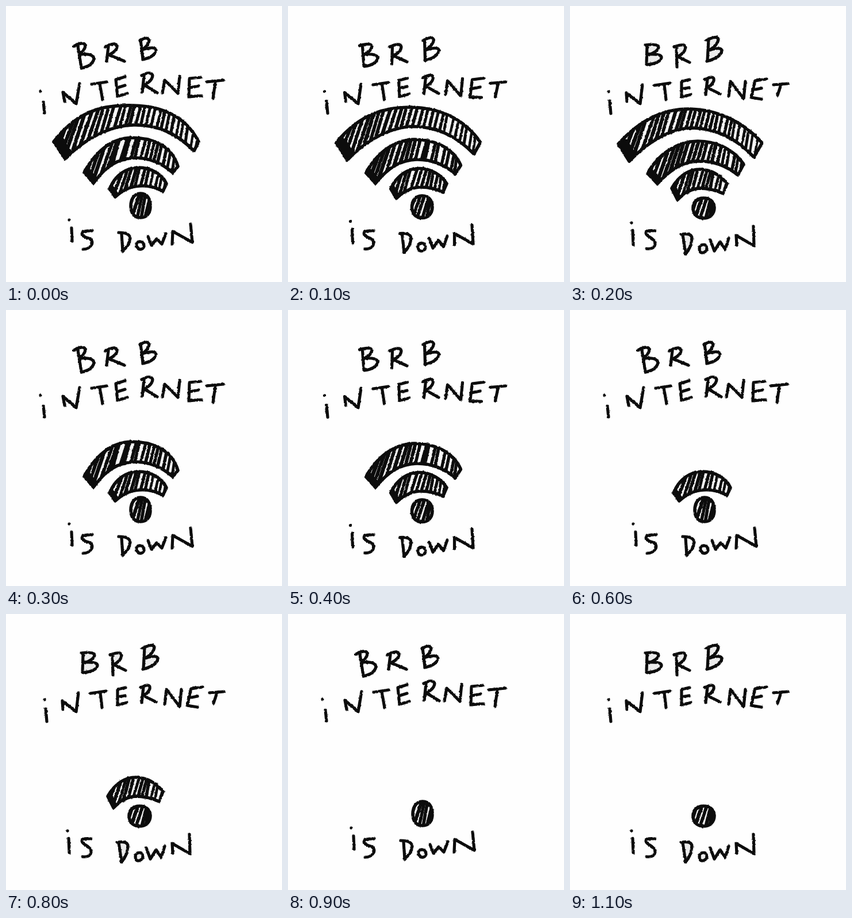
An HTML page that plays this animation: 480 px wide and 480 px high, repeating every 1.2 s.

```html
<!DOCTYPE html>
<html lang="en">
<head>
<meta charset="utf-8">
<title>BRB, internet is down</title>
<style>
  html, body { margin: 0; width: 100%; height: 100%; overflow: hidden; background: #fefefe; }
  svg { display: block; width: 100vw; height: 100vh; }
  .ink { fill: none; stroke: #0c0c0c; stroke-width: 5.2; stroke-linecap: round; stroke-linejoin: round; }
  .pose { opacity: 0; animation: pose .3s step-end infinite; }
  .pose1 { animation-delay: -.2s; }
  .pose2 { animation-delay: -.1s; }
  .big { animation: big 1.2s step-end infinite; }
  .mid { animation: mid 1.2s step-end infinite; }
  .small { animation: small 1.2s step-end infinite; }
  @keyframes pose { 0% { opacity: 1; } 33.3333%, 100% { opacity: 0; } }
  @keyframes big { 0% { opacity: 1; } 25%, 100% { opacity: 0; } }
  @keyframes mid { 0% { opacity: 1; } 50%, 100% { opacity: 0; } }
  @keyframes small { 0% { opacity: 1; } 75%, 100% { opacity: 0; } }
</style>
</head>
<body>
<svg id="stage" viewBox="0 0 480 480" role="img" aria-label="BRB internet is down">
  <filter id="rough" filterUnits="userSpaceOnUse" x="0" y="0" width="480" height="480" color-interpolation-filters="sRGB">
    <feTurbulence type="fractalNoise" baseFrequency=".28" numOctaves="1" seed="4"/>
    <feDisplacementMap in="SourceGraphic" scale="3" xChannelSelector="R" yChannelSelector="G"/>
  </filter>
</svg>
<script>
// Every shape has two drawings with the same structure; the third is a blend.
// Bowls come before stems so that their shading stays underneath.
const brb = [
  ['M118 70Q134 61 138 68Q138 76 128 84Q152 82 153 92Q150 104 132 108',
   'M131 68Q153 65 154 72Q153 79 138 84Q160 83 159 90Q156 100 134 102'],
  ['M125 70L131 107', 'M134 70L133 101'],
  ['M173 71Q190 62 193 69Q194 78 179 85', 'M181 71Q200 64 201 72Q200 82 187 88'],
  ['M178 71L175 96', 'M185 72L186 106'],
  ['M179 85L206 96', 'M187 88L208 98'],
  ['M233 60Q246 52 249 60Q248 68 237 76Q260 69 261 77Q258 89 238 93',
   'M237 60Q256 50 258 58Q257 68 242 77Q264 70 264 78Q262 90 238 96'],
  ['M234 59L238 92', 'M241 59L239 95']
];
const internet = [
  ['M60 148L60 148', 'M67 149L67 149'],
  ['M65 167L67 186', 'M69 164L71 187'],
  ['M102 166L99 150L122 170L128 135', 'M99 166L98 151L122 170L126 137'],
  ['M149 136L175 132', 'M147 138L174 134'],
  ['M163 135L168 163', 'M164 137L167 163'],
  ['M207 123L191 128L194 157L211 152', 'M208 128L194 131L194 158L210 154'],
  ['M194 142L207 138', 'M195 144L207 142'],
  ['M236 121Q252 112 255 121Q254 131 240 137', 'M234 128Q252 119 250 130Q247 138 239 142'],
  ['M240 121L237 150', 'M239 127L236 154'],
  ['M240 137L263 151', 'M239 142L261 153'],
  ['M272 151L276 129L299 152L302 122', 'M276 157L279 131L302 161L305 131'],
  ['M339 124L319 126L318 158L340 156', 'M342 127L322 130L315 159L333 162'],
  ['M320 142L335 139', 'M318 146L333 143'],
  ['M349 132L378 129', 'M354 137L379 135'],
  ['M364 132L360 161', 'M367 137L361 155']
];
const isDown = [
  ['M110 372L110 372', 'M107 377L107 377'],
  ['M114 386L115 409', 'M109 390L110 415'],
  ['M150 391C126 390 128 400 144 404C156 409 148 423 134 423',
   'M148 391C126 389 129 397 142 404C153 412 148 424 133 422'],
  ['M196 394Q215 394 216 404Q215 417 202 426', 'M193 397Q212 394 212 404Q211 420 201 431'],
  ['M201 396L203 426', 'M196 398L201 431'],
  ['M234 410Q226 409 227 417Q229 424 235 423Q241 421 240 415Q238 410 234 410',
   'M233 415Q225 415 225 422Q225 430 231 429Q238 427 238 422Q237 415 233 415'],
  ['M247 401L253 416L262 405L271 414L278 396', 'M244 407L251 426L261 410L270 423L276 404'],
  ['M289 414L290 392L324 411L321 379', 'M290 416L289 399L320 417L319 383']
];
// step, line widths left to right, and the width of the inked left end
const signal = [
  { name: 'big', step: 9.4, thick: 6.6, thin: 4.4, cap: 34, paths: [
    'M83 236C130 175 180 172 222 173C264 174 310 187 335 236L327 252C297 222 264 206 222 207C180 208 135 232 103 266',
    'M84 240C125 195 165 179 207 179C255 180 300 200 334 238L320 263C295 236 260 213 212 212C175 213 135 236 103 270'] },
  { name: 'mid', step: 9.2, thick: 6.8, thin: 4.8, cap: 22, paths: [
    'M136 289C158 250 185 230 218 229C250 229 288 240 299 279L290 290C272 274 250 264 224 264C198 265 175 276 152 308',
    'M135 291C155 255 190 235 222 235C255 235 285 250 302 275L292 294C272 278 248 269 222 270C195 271 175 284 152 309'] },
  { name: 'small', step: 8.6, thick: 6, thin: 4.6, cap: 16, paths: [
    'M180 318C190 295 208 281 231 281C252 281 272 293 279 309L273 322C260 315 246 312 232 313C215 314 202 321 190 332',
    'M177 317C190 294 208 284 226 284C245 284 262 295 273 309L266 326C253 320 240 317 224 317C208 319 198 326 187 337'] },
  { name: 'dot', step: 8.4, thick: 6, thin: 6, cap: 0, paths: [
    'M234 326C246 326 251 336 251 348C251 360 245 368 234 368C223 368 217 360 217 348C217 336 223 326 234 326',
    'M232 334C244 334 251 341 251 351C251 362 243 369 232 369C221 369 214 362 214 351C214 341 221 334 232 334'] }
];

let seed = 7;
const random = () => (seed = seed * 16807 % 2147483647) / 2147483647;
const numbers = path => path.match(/[\d.]+/g).map(Number);

function blend([a, b], k) {
  const target = numbers(b);
  let i = 0;
  return a.replace(/[\d.]+/g, n => +n + (target[i++] - n) * k);
}

function add(parent, tag, attrs) {
  const node = document.createElementNS('http://www.w3.org/2000/svg', tag);
  for (const key in attrs) node.setAttribute(key, attrs[key]);
  return parent.appendChild(node);
}

function drawText(parent, strokes, k) {
  for (const pair of strokes) {
    const d = blend(pair, k);
    const shaded = k === 1 && d.includes('Q');
    add(parent, 'path', { d, fill: shaded ? '#ebebeb' : 'none' });
  }
}

function drawBand(parent, band, k) {
  const d = blend(band.paths, k) + 'Z';
  const points = numbers(d);
  const xs = points.filter((_, i) => i % 2 === 0);
  const ys = points.filter((_, i) => i % 2 === 1);
  const left = Math.min(...xs), right = Math.max(...xs);
  const top = Math.min(...ys), bottom = Math.max(...ys);
  const height = bottom - top;
  const start = left - height * 0.4;
  const id = band.name + k * 2;

  const group = add(parent, 'g', { class: band.name });
  add(add(group, 'clipPath', { id }), 'path', { d });
  add(group, 'path', { d, fill: '#f6f6f6', stroke: 'none' });
  const hatch = add(group, 'g', { 'clip-path': `url(#${id})` });

  // The lines lean less and grow thinner towards the right.
  for (let x = start; x < right; x += band.step * (0.8 + 0.4 * random())) {
    const part = (x - start) / (right - start);
    const width = band.thick + (band.thin - band.thick) * part + random() - 0.5;
    const lean = height * (0.4 - 0.25 * part) + (random() - 0.5) * 5;
    add(hatch, 'path', { d: `M${x} ${bottom}L${x + lean} ${top}`, 'stroke-width': width });
  }
  if (band.cap) {
    const end = points.slice(-2);
    add(hatch, 'path', { d: `M${points[0]} ${points[1]}L${end}`, 'stroke-width': band.cap });
  }
  add(group, 'path', { d, 'stroke-width': 5.6 });
}

const stage = document.getElementById('stage');
[0, 0.5, 1].forEach((k, i) => {
  const pose = add(stage, 'g', { class: `ink pose pose${i}`, filter: 'url(#rough)' });
  for (const words of [brb, internet, isDown]) drawText(pose, words, k);
  for (const band of signal) drawBand(pose, band, k);
});
</script>
</body>
</html>
```
